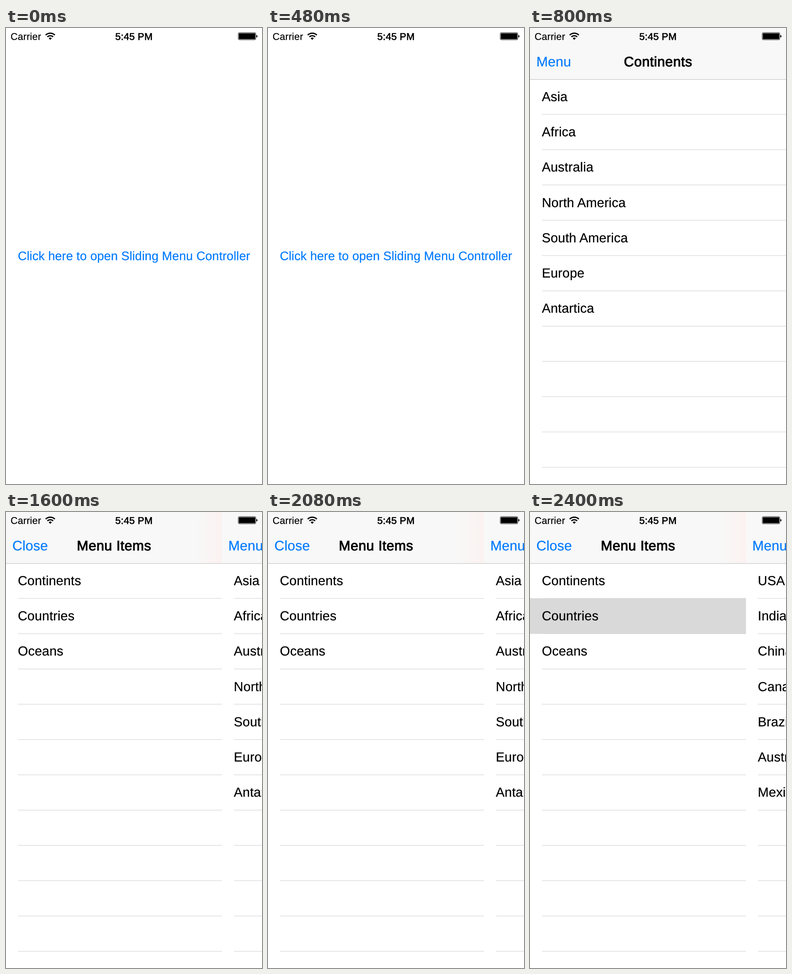
An HTML page for the animation above (3200 ms loop, 561 px wide and 998 px high).

```html
<!DOCTYPE html>
<html lang="en">
<head>
<meta charset="utf-8">
<title>Sliding menu</title>
<style>
  html, body { margin: 0; width: 100%; height: 100%; overflow: hidden; background: #fff; }
  svg { display: block; width: 561px; height: 998px; font-family: "Liberation Sans", Arial, sans-serif; }
  text { stroke: #000; stroke-width: .25px; text-rendering: geometricPrecision; }
  .row { font-size: 28.6px; letter-spacing: .2px; }
  .nav { font-size: 30.2px; letter-spacing: .2px; fill: #007aff; stroke: #007aff; }
  .title { font-size: 30.2px; letter-spacing: .55px; stroke-width: 1.05px; text-anchor: middle; }
  .link { font-size: 26.9px; letter-spacing: .13px; fill: #007aff; stroke: #007aff; text-anchor: middle; }
  .carrier { font-size: 21.4px; letter-spacing: .25px; }
  .clock { font-size: 21.4px; letter-spacing: .3px; stroke-width: .75px; text-anchor: middle; }
</style>
</head>
<body>
<svg id="stage" viewBox="0 0 561 998">
  <defs>
    <linearGradient id="tint">
      <stop offset="0" stop-color="#f8f8f8"/>
      <stop offset="1" stop-color="#fbf2f1"/>
    </linearGradient>
  </defs>
  <rect width="561" height="998" fill="#fff"/>
  <g id="start"><text class="link" x="280.5" y="508.2">Click here to open Sliding Menu Controller</text></g>
  <g id="list"></g>
  <g id="menu"></g>
  <g id="status">
    <text class="carrier" x="10" y="25.8">Carrier</text>
    <g fill="none" stroke="#000" stroke-width="2.9">
      <path d="M87 15.5A14.2 14.2 0 0 1 107 15.5"/>
      <path d="M90.7 19.4A9 9 0 0 1 103.3 19.4"/>
    </g>
    <path d="M97 26L93.6 22.4A5 5 0 0 1 100.4 22.4Z"/>
    <text class="clock" x="280.4" y="25.6">5:45 PM</text>
    <rect x="508.9" y="10.1" width="38.6" height="15.8" rx="2.6" fill="none" stroke="#000" stroke-width=".88"/>
    <rect x="510.2" y="11.4" width="36" height="13.2" rx="1.2"/>
    <path d="M548.7 15.2Q551.2 15.6 551.2 18T548.7 20.8Z"/>
  </g>
</svg>
<script>
const STEP = 800, STEPS = 4, WIDTH = 561, OPEN = 473.3, PITCH = 77.22, TOP = 112.3;
const el = id => document.getElementById(id);

const rect = (x, y, w, h, fill) =>
  `<rect x="${x}" y="${y}" width="${w}" height="${h}" fill="${fill}"/>`;
const text = (cls, x, y, s) => `<text class="${cls}" x="${x}" y="${y}">${s}</text>`;
const rowLine = i => TOP - .87 + PITCH * i;

function panel({ width, title, button, items, picked = -1, tint = false }) {
  let out = rect(0, 0, width, 998, "#fff") + rect(0, 0, width, TOP, "#f8f8f8");
  if (tint) out += rect(width - 60, 0, 60, TOP, "url(#tint)");
  out += rect(0, TOP, width, .88, "#b2b2b2");
  for (let i = 1; i <= 11; i++)
    out += rect(26.3, rowLine(i), width - 26.3, .88, "#c8c7cc");
  if (picked >= 0)
    out += rect(0, rowLine(picked), width, PITCH + .88, "#d9d9d9");
  items.forEach((s, i) => out += text("row", 26, 160 + PITCH * i, s));
  return out + text("nav", 13.9, 84, button) + text("title", width / 2 + .2, 84, title);
}

const continents = ["Asia", "Africa", "Australia", "North America", "South America", "Europe", "Antartica"];
const countries = ["USA", "India", "China", "Canada", "Brazil", "Australia", "Mexico"];
const listPanel = (title, items) => panel({ width: WIDTH, title, button: "Menu", items });
const menuPanel = picked => panel({
  width: OPEN, title: "Menu Items", button: "Close",
  items: ["Continents", "Countries", "Oceans"], picked, tint: true
});

let shown = -1;
function render(ms) {
  const step = Math.floor(ms / STEP) % STEPS;
  if (step === shown) return;
  shown = step;
  const open = step >= 2, chosen = step === 3;
  el("start").style.display = step ? "none" : "";
  el("list").innerHTML = !step ? "" :
    chosen ? listPanel("Countries", countries) : listPanel("Continents", continents);
  el("list").setAttribute("transform", `translate(${open ? OPEN : 0} 0)`);
  el("menu").innerHTML = open ? menuPanel(chosen ? 1 : -1) : "";
}

const begin = performance.now();
function tick() {
  render(performance.now() - begin);
  requestAnimationFrame(tick);
}
tick();
</script>
</body>
</html>
```
